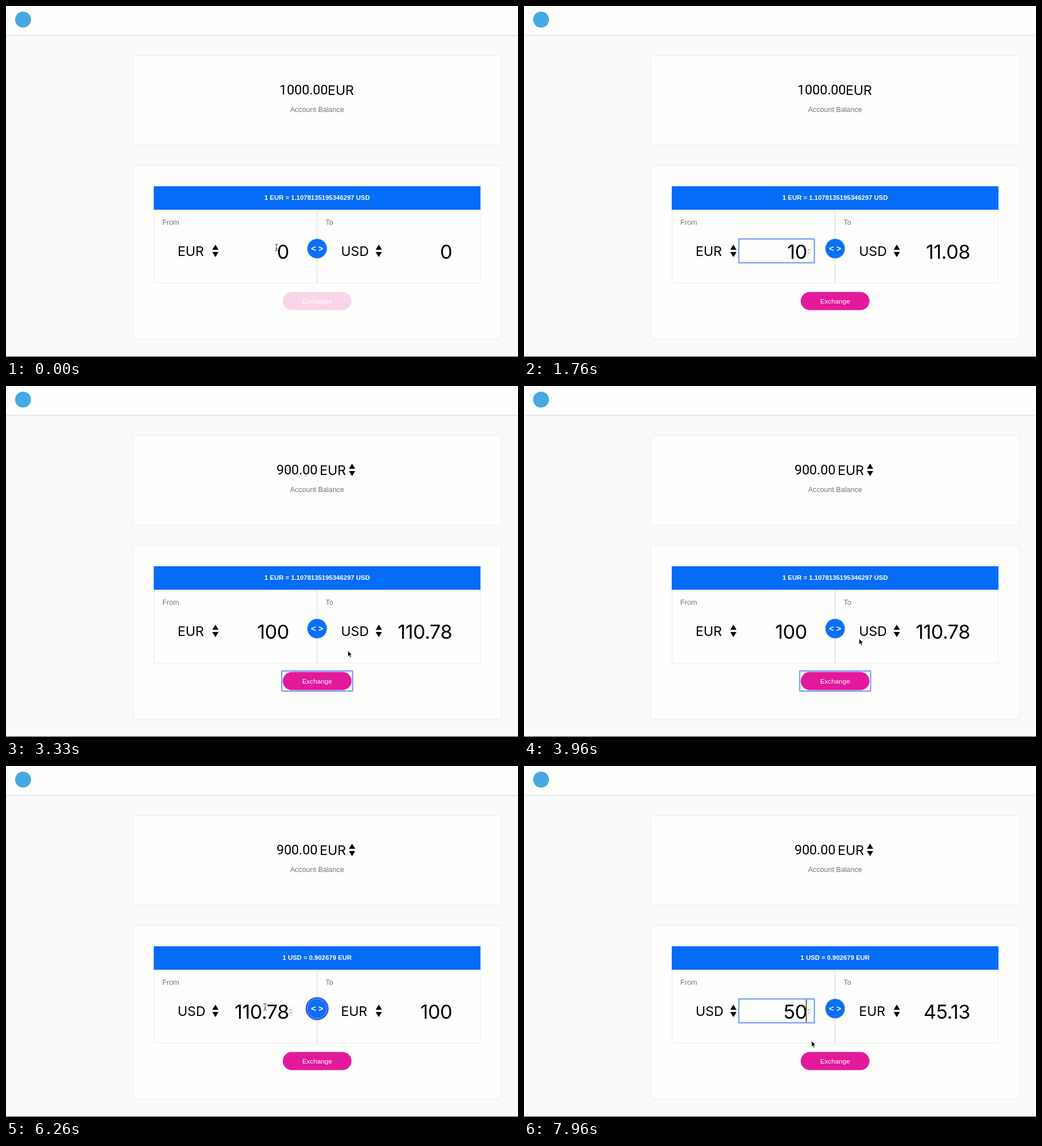
Animation of 901x621 px, one loop 8000 ms. Source, as an HTML page:

```html
<!DOCTYPE html>
<html lang="en">
<head>
<meta charset="utf-8">
<title>Currency exchange</title>
<style>
  html, body { margin: 0; width: 100%; height: 100%; overflow: hidden; background: #fafafc; }
  svg { display: block; width: 901px; height: 621px; }
  .card, .box { fill: #fefefd; stroke: #ececee; }
  .label { font: 12.7px "Liberation Sans", Arial, sans-serif; fill: #757575; }
  .rate { font: bold 11.45px "Liberation Sans", Arial, sans-serif; fill: #fff; }
  .action { font: 11.8px "Liberation Sans", Arial, sans-serif; fill: #fff; }
  .swap { font: bold 15px "Liberation Sans", Arial, sans-serif; fill: #fff; }
  .balance { font: 23.5px Roboto, sans-serif; }
  .code { font: 23.3px Inter, sans-serif; }
  .amount { font: 34.5px Inter, sans-serif; letter-spacing: -.5px; }
  .mid { text-anchor: middle; }
  .end { text-anchor: end; }
  .ring { fill: none; stroke: #7ba6f7; stroke-width: 2.4; }
</style>
</head>
<body>
<svg viewBox="0 0 901 621">
  <defs>
    <path id="sort" d="M-5.5 -2 L0 -11 L5.5 -2Z M-5.5 2 L0 11 L5.5 2Z"/>
  </defs>

  <rect width="901" height="621" fill="#fafafc"/>
  <rect width="901" height="51" fill="#fefefd"/>
  <rect y="51" width="901" height="1.5" fill="#e3e3e4"/>
  <circle cx="30" cy="24" r="14" fill="#45a9e3"/>
  <rect y="618.5" width="901" height="2.5"/>

  <rect class="card" x="223.5" y="87.5" width="648" height="157.5" rx="1"/>
  <text class="balance end" id="balance" y="156"></text>
  <text class="code" id="balanceCode" y="157">EUR</text>
  <use id="balanceSort" href="#sort" x="609" y="148"/>
  <text class="label mid" x="547.5" y="187">Account Balance</text>

  <rect class="card" x="223.5" y="281.5" width="648" height="306" rx="1"/>
  <rect class="box" x="260.5" y="340.5" width="574" height="148.5"/>
  <rect x="260" y="318" width="575" height="41.5" fill="#056cf7"/>
  <text class="rate mid" id="rate" x="547.5" y="342.3"></text>
  <rect x="546.5" y="360" width="2" height="128.5" fill="#e6e6e8"/>

  <text class="label" x="275" y="386">From</text>
  <text class="label" x="562.5" y="386">To</text>
  <text class="code" id="fromCode" x="302" y="441"></text>
  <text class="code" id="toCode" x="589.5" y="441"></text>
  <use href="#sort" x="368.5" y="432"/>
  <use href="#sort" x="656" y="432"/>

  <rect id="selection" x="397" y="412" width="100" height="41" fill="#b4d6fd"/>
  <text class="amount end" id="from" x="498" y="445.5"></text>
  <text class="amount end" id="to" x="785" y="445.5"></text>
  <rect id="caret" y="412" width="1.2" height="41"/>
  <g id="spinner" fill="none">
    <rect x="497.5" y="426.5" width="7" height="13" rx="2" fill="#fff" stroke="#dcdcdc" stroke-width=".8"/>
    <path d="M499.4 431.2 L501 429.4 L502.6 431.2 M499.4 434.8 L501 436.6 L502.6 434.8" stroke="#555"/>
  </g>
  <rect class="ring" id="inputRing" x="378" y="411" width="133" height="42" rx="1"/>

  <g id="swapRing">
    <circle cx="547.5" cy="428" r="21" fill="#a9c2fb"/>
    <circle cx="547.5" cy="428" r="19.8" fill="#2b40e6"/>
  </g>
  <circle cx="547.5" cy="428" r="17.3" fill="#0a6ff8" stroke="#a9c4ee" stroke-width=".8"/>
  <text class="swap mid" x="547.5" y="433">&lt; &gt;</text>

  <rect id="button" x="487" y="504.5" width="121" height="32" rx="16"/>
  <text class="action mid" x="547.5" y="524.7">Exchange</text>
  <rect class="ring" id="buttonRing" x="485.2" y="502.7" width="124.8" height="35.6" rx="1"/>

  <g id="ibeam" fill="none" stroke-linecap="round">
    <path d="M-2.5 -6 Q0 -6 0 -4 Q0 -6 2.5 -6 M0 -4 V4 M-2.5 6 Q0 6 0 4 Q0 6 2.5 6 M-1.5 2 H1.5" stroke="#444"/>
  </g>
  <path id="arrow" d="M0 0 V10.5 L2.4 8.3 L4 12 L5.8 11.2 L4.2 7.6 H7.4Z" stroke="#fff" stroke-width=".8"/>
  <path id="hand" d="M-1 0 Q0 -1.2 1 0 V4 Q2 3.2 2.8 4.2 Q4 3.4 4.6 4.6 Q6.4 4.2 6.4 6 Q6.4 9 5 11 H-.5 Q-2 8.5 -4 6.5 Q-4 4.8 -2.4 5.4 L-1 6.6Z" fill="#fff" stroke="#222" stroke-width=".9"/>
</svg>
<script>
  const LOOP = 8000;
  const el = id => document.getElementById(id);
  const show = (id, on) => { el(id).style.display = on ? "" : "none"; };
  const put = (id, text) => { if (el(id).textContent !== text) el(id).textContent = text; };
  const within = (t, ...spans) => spans.some(([a, b]) => t >= a && t < b);
  const at = (t, steps) => steps.filter(s => t >= s[0]).pop()[1];

  // Pointer stops: time, x, y
  const stops = [
    [0, 476, 426], [30, 476, 426], [330, 467, 427], [2120, 467, 427],
    [2260, 488, 452], [2450, 533, 505], [2640, 549, 527], [2900, 549, 527],
    [2980, 574, 505], [3060, 604, 474], [3100, 604, 474], [3500, 600, 462],
    [3960, 590, 446], [4030, 573, 442], [4200, 573, 442], [4650, 555, 416],
    [5400, 555, 416], [5550, 502, 422], [5700, 454, 425], [6220, 454, 425],
    [6260, 456, 425], [7640, 456, 425], [7800, 480, 452], [7960, 506, 485], [LOOP, 506, 485]
  ];
  const entries = [[0, "0"], [1260, "10"], [2030, "100"], [5200, "110.78"], [7300, "5"], [7500, "50"]];
  const focusSteps = [[0, ""], [600, "input"], [2860, "button"], [4920, "swap"], [6400, "input"]];

  function pointer(t) {
    const i = Math.max(1, stops.findIndex(s => s[0] > t));
    const [a, b] = [stops[i - 1], stops[i]];
    const k = (t - a[0]) / (b[0] - a[0]);
    return [a[1] + (b[1] - a[1]) * k, a[2] + (b[2] - a[2]) * k];
  }

  function convert(amount, swapped) {
    const result = amount * (swapped ? 0.902679 : 1.1078135195346297);
    return String(+result.toFixed(2));
  }

  function drawPointer(t) {
    const [x, y] = pointer(t);
    const overInput = x > 377 && x < 512 && y > 410 && y < 454;
    const overButton = x > 487 && x < 608 && y > 504 && y < 537;
    const kind = overInput ? "ibeam" : overButton ? "hand" : "arrow";
    const typing = within(t, [1260, 2120], [7300, 7640]);
    for (const id of ["ibeam", "arrow", "hand"]) {
      show(id, id === kind && !typing);
      el(id).setAttribute("transform", `translate(${x} ${y})`);
    }
    return overInput && t >= 70;
  }

  function draw(t) {
    const swapped = t >= 5200, paid = t >= 2900;
    const amount = at(t, entries), focus = at(t, focusSteps);

    put("balance", paid ? "900.00" : "1000.00");
    el("balance").setAttribute("x", paid ? 548.2 : 566.5);
    el("balanceCode").setAttribute("x", paid ? 552 : 566);
    show("balanceSort", paid);

    put("rate", swapped ? "1 USD = 0.902679 EUR" : "1 EUR = 1.1078135195346297 USD");
    put("fromCode", swapped ? "USD" : "EUR");
    put("toCode", swapped ? "EUR" : "USD");
    put("from", amount);
    put("to", convert(+amount, swapped));
    el("button").setAttribute("fill", +amount ? "#e3199c" : "#f9d5ea");

    for (const id of ["input", "button", "swap"]) show(id + "Ring", focus === id);
    show("selection", within(t, [6560, 7300]));
    show("caret", within(t, [600, 1100], [1260, 1760], [2030, 2530], [6400, 6560], [7300, LOOP]));
    el("caret").setAttribute("x", t < 5000 ? 474.6 : t < 7000 ? 449.5 : 496);
    show("spinner", drawPointer(t) || focus === "input");
  }

  const start = performance.now();
  function tick() {
    draw((performance.now() - start) % LOOP);
    requestAnimationFrame(tick);
  }
  tick();
</script>
</body>
</html>
```
